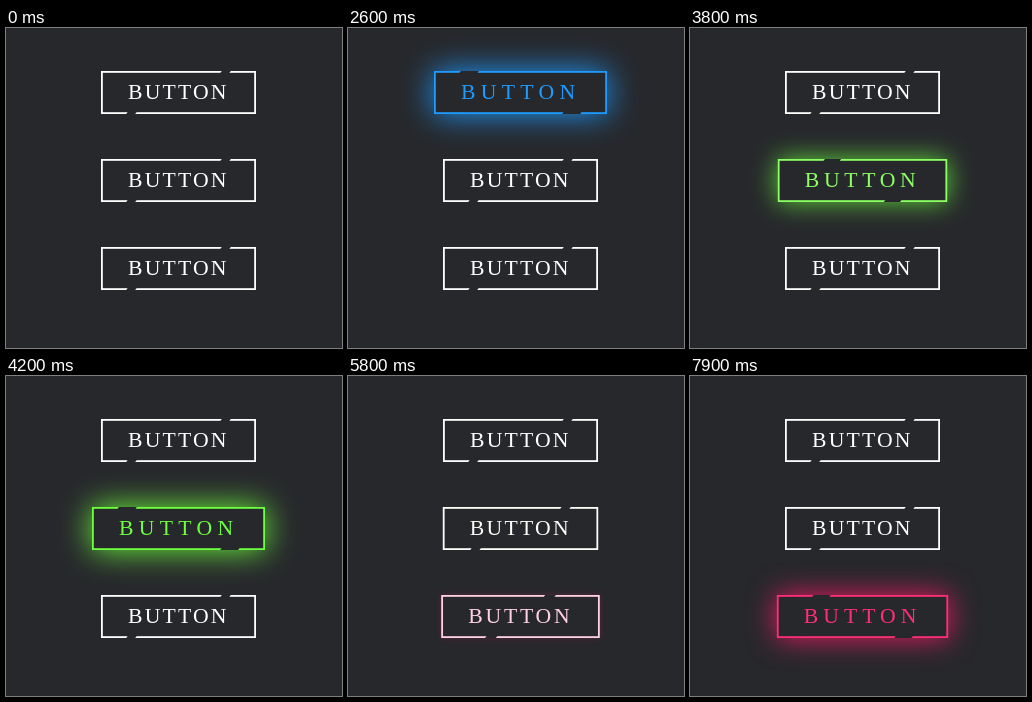
These frames come from a looping animation (336x320 px, 8 s). An HTML page with a canvas:

```html
<!DOCTYPE html>
<html lang="en">
<head>
<meta charset="utf-8">
<title>Glowing buttons</title>
<style>
  html, body { margin: 0; width: 100%; height: 100%; overflow: hidden; background: #27282c; }
  canvas { display: block; }
</style>
</head>
<body>
<canvas id="stage" width="336" height="320"></canvas>
<script>
const ctx = document.getElementById('stage').getContext('2d');
const LOOP = 8000, STEP = 100, FADE = 500;
const BACK = '#27282c';
const CENTER = 172.5, HEIGHT = 43, LINE = 1.8, EM = 21.7, PAD = 27;
const SKEW = Math.tan(35 * Math.PI / 180);

const buttons = [
  { y: 43, color: [30, 155, 255], enter: 1766, leave: 3228 },
  { y: 131, color: [110, 255, 62], enter: 3550, leave: 5400 },
  { y: 219, color: [255, 24, 103], enter: 5722, leave: 7850 }
];

const mix = (a, b, p) => a + (b - a) * p;
const clamp = x => Math.min(1, Math.max(0, x));

// cubic-bezier(0.25, 0.1, 0.25, 1)
function ease(x) {
  const curve = (u, a, b) => 3 * u * (1 - u) ** 2 * a + 3 * u * u * (1 - u) * b + u ** 3;
  let lo = 0, hi = 1;
  for (let i = 0; i < 24; i++) {
    const mid = (lo + hi) / 2;
    if (curve(mid, 0.25, 0.25) < x) lo = mid; else hi = mid;
  }
  return curve(lo, 0.1, 1);
}

function hover(b, t) {
  const phase = start => ease(clamp((t - start) / FADE));
  return phase(b.enter) - phase(b.leave);
}

// Slanted gap in the border, centred on x
function drawGap(x, y, width) {
  const h = 3.6;
  ctx.save();
  ctx.translate(x, y);
  ctx.transform(1, 0, -SKEW, 1, 0, 0);
  ctx.fillRect(-width / 2, -h / 2, width, h);
  ctx.restore();
}

function drawButton(b, t) {
  const p = hover(b, t);
  const width = mix(155, 173, p), left = CENTER - width / 2;
  const tint = `rgb(${b.color.map(c => Math.round(mix(255, c, p)))})`;

  ctx.save();
  ctx.shadowColor = `rgba(${b.color},${p})`;
  ctx.shadowBlur = 32 * p;
  ctx.fillStyle = tint;
  ctx.fillRect(left, b.y, width, HEIGHT);
  ctx.restore();

  ctx.fillStyle = BACK;
  ctx.fillRect(left + LINE, b.y + LINE, width - 2 * LINE, HEIGHT - 2 * LINE);
  const gap = mix(9, 18, p);
  drawGap(left + width * mix(0.8, 0.2, p), b.y + 1.8, gap);
  drawGap(left + width * mix(0.2, 0.8, p), b.y + HEIGHT - 1.8, gap);

  ctx.fillStyle = tint;
  ctx.font = `${EM}px "Liberation Serif", serif`;
  ctx.letterSpacing = mix(2.17, 5.3, p) + 'px';
  ctx.fillText('BUTTON', left + PAD, b.y + 28);
}

function draw(now) {
  const t = Math.floor(now % LOOP / STEP) * STEP;
  ctx.fillStyle = BACK;
  ctx.fillRect(0, 0, 336, 320);
  buttons.forEach(b => drawButton(b, t));
}

const begin = performance.now();
function tick() {
  draw(performance.now() - begin);
  requestAnimationFrame(tick);
}
tick();
</script>
</body>
</html>
```
